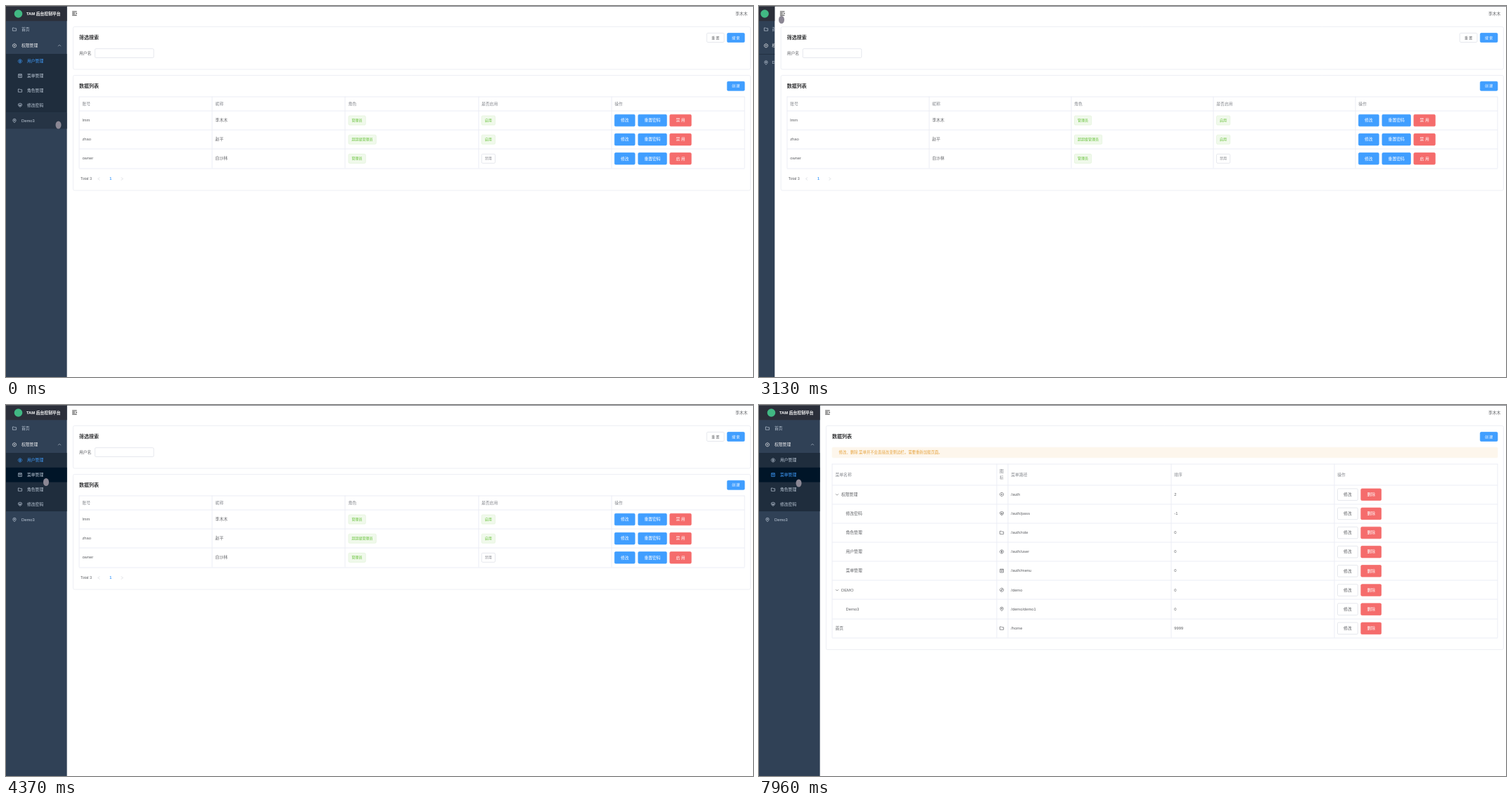
Write an HTML page with a canvas that moves like this. It is 1062 px wide and 527 px high and loops after 8000 ms.

```html
<!DOCTYPE html>
<html lang="zh-CN">
<head>
<meta charset="utf-8">
<style>
html, body { margin: 0; width: 100%; height: 100%; overflow: hidden; background: #fff; }
canvas { display: block; }
</style>
</head>
<body>
<canvas id="stage" width="1062" height="527"></canvas>
<script>
const ctx = document.getElementById('stage').getContext('2d');
const FONT = '"Liberation Sans", "Noto Sans CJK SC", "Noto Sans CJK", sans-serif';
const BLUE = '#409eff', RED = '#f56c6c', TEXT = '#606266', LINE = '#ebeef5', PALE = '#bfcbd9';
const RIGHT = 1050, LOOP = 8000, ROW = 27.15;

const TICKS = [0, 150, 300, 425, 550, 700, 850, 970, 1120, 1240, 1390, 2170, 2320, 2460, 2585, 2710,
  2860, 3010, 3130, 3260, 3380, 3510, 3640, 3760, 3890, 4010, 4130, 4250, 4370,
  6510, 6630, 6750, 6900, 7020, 7810, 7960];

// Pointer path: time, x, y
const POINTER = [[0, 74.5, 169], [150, 75.2, 168.5], [300, 75, 150], [550, 63.5, 27], [700, 82, 19],
  [850, 90, 16], [970, 96, 20], [1390, 98, 18.5], [2170, 104.5, 19.5], [2320, 103, 19], [2710, 48, 18.5],
  [2860, 33, 18.5], [3130, 32, 19.5], [3260, 33, 20], [3760, 53, 67], [3890, 53.5, 78], [4370, 57, 109.5],
  [7810, 57, 110], [7960, 56.5, 111], [LOOP, 56.5, 111]];

const ICONS = {
  folder: 'M1.5 3h5l2 2h6v8.5h-13z',
  lock: 'M8 1.5a6.5 6.5 0 1 0 .01 0zM5.5 5.5l5 5M10.5 5.5l-5 5',
  coin: 'M8 1.5a6.5 6.5 0 1 0 .01 0zM8 4v8M10 6h-3.5v2h3v2h-3.5',
  box: 'M2 2h12v12h-12zM5 2v4h6v-4M5 10h6',
  shield: 'M8 1.5l6 2v5q-1 4-6 6q-5-2-6-6v-5zM5.5 7h5v3h-5z',
  pin: 'M8 15q-5.500-5-5.500-8.500a5.500 5.500 0 0 1 11 0q0 3.500-5.500 8.500zM8 5a1.800 1.800 0 1 0 .01 0z',
  compass: 'M8 1.5a6.5 6.5 0 1 0 .01 0zM11 5l-2 4-4 2 2-4z'
};
for (const name in ICONS) ICONS[name] = new Path2D(ICONS[name]);

const USERS = [
  ['lmm', '李木木', '管理员', true],
  ['zhao', '赵平', '超超级管理员', true],
  ['owner', '白沙林', '管理员', false]
];
const MENUS = [
  ['权限管理', 'lock', '/auth', '2', 13, true],
  ['修改密码', 'shield', '/auth/pass', '-1', 19.5],
  ['角色管理', 'folder', '/auth/role', '0', 19.5],
  ['用户管理', 'coin', '/auth/user', '0', 19.5],
  ['菜单管理', 'box', '/auth/menu', '0', 19.5],
  ['DEMO', 'compass', '/demo', '0', 13, true],
  ['Demo3', 'pin', '/demo/demo1', '0', 19.5],
  ['首页', 'folder', '/home', '9999', 4.5]
];
const SUBMENU = [['用户管理', 'coin'], ['菜单管理', 'box'], ['角色管理', 'folder'], ['修改密码', 'shield']];

const clamp = v => Math.max(0, Math.min(1, v));
const lerp = (a, b, p) => a + (b - a) * p;

// CSS "ease" timing
function ease(start, length, t) {
  const x = clamp((t - start) / length);
  let lo = 0, hi = 1, s = 0;
  for (let i = 0; i < 20; i++) {
    s = (lo + hi) / 2;
    if (.75 * s * (1 - s) + s ** 3 < x) lo = s; else hi = s;
  }
  return x === 0 || x === 1 ? x : .3 * s * (1 - s) ** 2 + 3 * s * s * (1 - s) + s ** 3;
}

function mix(p) {
  const [r, g, b] = [[191, 64], [203, 158], [217, 255]].map(([from, to]) => Math.round(lerp(from, to, p)));
  return `rgb(${r},${g},${b})`;
}

function pointerAt(t) {
  const i = POINTER.findIndex(key => key[0] > t);
  const [t0, x0, y0] = POINTER[i - 1], [t1, x1, y1] = POINTER[i];
  const p = (t - t0) / (t1 - t0);
  return [lerp(x0, x1, p), lerp(y0, y1, p)];
}

function rect(x, y, w, h, color) {
  ctx.fillStyle = color;
  ctx.fillRect(x, y, w, h);
}

function text(str, x, y, { color = TEXT, size = 5.8, weight = 400, align = 'left' } = {}) {
  ctx.font = `${weight} ${size}px ${FONT}`;
  ctx.textAlign = align;
  ctx.textBaseline = 'middle';
  ctx.fillStyle = color;
  ctx.fillText(str, x, y);
}

function box(x, y, w, h, fill, border = fill, radius = 1.5) {
  ctx.beginPath();
  ctx.roundRect(x, y, w, h, radius);
  ctx.fillStyle = fill;
  ctx.fill();
  ctx.lineWidth = .7;
  ctx.strokeStyle = border;
  ctx.stroke();
}

function button(label, x, y, w, h, fill, size = 5.8) {
  const plain = fill === '#fff';
  box(x, y, w, h, fill, plain ? '#dcdfe6' : fill);
  text(label, x + w / 2, y + h / 2 + .2, { size, weight: 500, align: 'center', color: plain ? TEXT : '#fff' });
}

function tag(label, x, y, on) {
  const w = label.length * 5 + 9.2;
  box(x, y - 6.5, w, 13, on ? '#f0f9eb' : '#fff', on ? '#e1f3d8' : '#dcdfe6');
  text(label, x + w / 2, y, { size: 5, align: 'center', color: on ? '#67c23a' : '#808389' });
}

function stroke(points, color, width = .6) {
  ctx.beginPath();
  points.forEach(([x, y]) => ctx.lineTo(x, y));
  ctx.strokeStyle = color;
  ctx.lineWidth = width;
  ctx.stroke();
}

function icon(name, x, y, color) {
  ctx.save();
  ctx.translate(x - 3.2, y - 3.2);
  ctx.scale(.4, .4);
  ctx.lineWidth = 1.7;
  ctx.strokeStyle = color;
  ctx.stroke(ICONS[name]);
  ctx.restore();
}

function grid(columns, rows) {
  const left = columns[0], top = rows[0], bottom = rows[rows.length - 1];
  columns.concat(RIGHT).forEach(x => rect(Math.round(x) - .5, top, 1, bottom - top, LINE));
  rows.forEach(y => rect(left, Math.round(y) - .5, RIGHT - left, 1, LINE));
}

function card(left, top, bottom, title) {
  box(left - 8.6, top, RIGHT + 17 - left, bottom - top, '#fff', '#e6e9f0', 2);
  text(title, left, top + 15.3, { size: 7, weight: 700, color: '#303133' });
}

const heading = (str, x, y) => text(str, x, y, { color: '#85888e', weight: 500 });

function userPage(left) {
  card(left, 29.5, 90, '筛选搜索');
  button('重 置', 996.3, 38.5, 24.7, 13, '#fff', 5);
  button('搜 索', 1025.3, 38.5, 24.7, 13, BLUE, 5);
  text('用户名', left, 67);
  box(left + 22.5, 60.7, 83.5, 12.8, '#fff', '#dcdfe6');

  card(left, 98.5, 262, '数据列表');
  button('创 建', 1025.3, 107.3, 24.7, 13, BLUE, 5);
  const width = (RIGHT - left) / 5;
  const columns = [0, 1, 2, 3, 4].map(i => left + i * width);
  grid(columns, [128.5, 149, 176.2, 203.4, 230.5]);
  ['账号', '昵称', '角色', '是否启用', '操作'].forEach((name, i) => heading(name, columns[i] + 4.4, 139));
  USERS.forEach(([login, nick, role, active], i) => {
    const y = 162.5 + i * ROW, x = columns[4];
    text(login, columns[0] + 4.4, y);
    text(nick, columns[1] + 4.4, y);
    tag(role, columns[2] + 4.6, y, true);
    tag(active ? '启用' : '禁用', columns[3] + 4.6, y, active);
    button('修改', x + 4.5, y - 8.3, 28.8, 16.6, BLUE);
    button('重置密码', x + 38, y - 8.3, 40.5, 16.6, BLUE);
    button(active ? '禁 用' : '启 用', x + 83, y - 8.3, 30.4, 16.6, RED);
  });

  text('Total 3', left + 2, 245.5, { size: 5.4 });
  text('1', left + 44.8, 245.5, { size: 5.4, weight: 700, align: 'center', color: BLUE });
  [[28, -1], [61, 1]].forEach(([x, d]) =>
    stroke([[left + x - d, 243.5], [left + x + d, 245.5], [left + x - d, 247.5]], '#c0c4cc'));
}

function menuPage(left) {
  card(left, 29.5, 347.5, '数据列表');
  button('创 建', 1025.3, 38.5, 24.7, 13, BLUE, 5);
  box(left, 60.2, RIGHT - left, 14.6, '#fdf6ec');
  text('修改、删除 菜单并不会直接改变侧边栏。需要重新加载页面。', left + 9.6, 67.8, { size: 5.4, color: '#e6a23c' });

  const columns = [0, 233.5, 250, 482, 714].map(x => left + x);
  const top = 113.5;
  grid(columns, [83.5, ...Array.from({ length: 9 }, (_, i) => top + i * ROW)]);
  heading('菜单名称', columns[0] + 4.5, 99);
  heading('图', columns[1] + 4.4, 94);
  heading('标', columns[1] + 4.4, 103.5);
  ['菜单路径', '排序', '操作'].forEach((name, i) => heading(name, columns[i + 2] + 4.3, 99));
  MENUS.forEach(([name, symbol, path, order, indent, group], i) => {
    const y = top + 13.7 + i * ROW, x = columns[4];
    if (group) stroke([[left + 5, y - 1], [left + 7, y + 1], [left + 9, y - 1]], TEXT);
    text(name, left + indent, y);
    icon(symbol, columns[1] + 7.6, y - .3, TEXT);
    text(path, columns[2] + 4.3, y);
    text(order, columns[3] + 4.3, y);
    button('修改', x + 4.5, y - 8.3, 28.8, 16.6, '#fff');
    button('删除', x + 37.8, y - 8.3, 28.8, 16.6, RED);
  });
}

function navbar(width, collapsed) {
  rect(width, 0, 1062 - width, 21, '#fff');
  rect(0, 0, 1062, 1, '#85878c');
  const x = width + 7.3;
  [[7.8, 0], [9.7, 2.6], [11.5, 2.6], [13.4, 0]].forEach(([y, inset]) => {
    const start = collapsed ? inset : 0;
    stroke([[x + start, y], [x + 6.6 - inset + start, y]], '#222', .8);
  });
  const tip = collapsed ? [x, x + 1.7] : [x + 6.6, x + 4.9];
  stroke([[tip[1], 9.3], [tip[0], 10.6], [tip[1], 11.9]], '#222', .8);
  text('李木木', 1037, 11.2);
}

function sidebar(t, width, open, collapsed) {
  const switched = clamp((t - 6430) / 200);
  const subHeight = collapsed ? 0 : 83.2 * open;
  const demoTop = 68 + subHeight;
  const iconX = collapsed ? 12 : lerp(10, 12, open);
  const labelX = lerp(18.5, 22, open);
  const label = (str, y, color = PALE) => { if (!collapsed) text(str, labelX, y, { color }); };

  ctx.save();
  ctx.beginPath();
  ctx.rect(0, 0, width, 527);
  ctx.clip();
  rect(0, 0, width, 527, '#304156');
  rect(0, 0, width, 21.3, '#2b2f3a');
  rect(0, 0, width, 1, '#50535b');

  const logoX = collapsed ? width / 2 : lerp(8, 17.5, open);
  ctx.beginPath();
  ctx.arc(logoX, 11, 5.8, 0, 7);
  ctx.fillStyle = '#41b883';
  ctx.fill();
  if (!collapsed) {
    ctx.globalAlpha = open;
    text('TAM 后台控制平台', logoX + 11.5, 11.2, { color: '#fff', weight: 700 });
    ctx.globalAlpha = 1;
  }

  if (t >= 3640 && t < 4010) rect(0, 44.8, width, 23.2, '#263445');
  if (t < 300) rect(0, demoTop, width, 23.2, '#263445');
  icon('folder', iconX, 33, PALE);
  label('首页', 33.3);
  icon('lock', iconX, 56.3, '#f4f4f5');
  label('权限管理', 56.5, '#f4f4f5');
  if (!collapsed) stroke([[74, 57.2], [76, 55.2], [78, 57.2]], PALE);
  icon('pin', iconX, demoTop + 11.8, PALE);
  label('Demo3', demoTop + 11.9);

  ctx.beginPath();
  ctx.rect(0, 68, width, subHeight);
  ctx.clip();
  rect(0, 68, width, 83.2, '#1f2d3d');
  const hovered = t >= 4250 ? 1 : t >= 4010 ? 0 : -1;
  if (hovered >= 0) rect(0, 68 + hovered * 20.8, width, 20.8, '#001528');
  SUBMENU.forEach(([name, symbol], i) => {
    const y = 78.4 + i * 20.8;
    const color = i === 0 ? mix(1 - switched) : i === 1 ? mix(switched) : PALE;
    icon(symbol, 20, y, color);
    text(name, 30, y + .1, { color });
  });
  ctx.restore();
}

function draw(t) {
  const collapsed = t >= 2066 && t < 3125;
  const open = t < 3125 ? 1 - ease(2066, 280, t) : ease(3125, 280, t);
  const width = lerp(22, 86.8, open);
  const leaving = ease(6457, 400, t), entering = ease(6857, 160, t);

  rect(0, 0, 1062, 527, '#fff');
  ctx.save();
  if (t < 6857) {
    ctx.globalAlpha = 1 - leaving;
    ctx.translate(12.4 * leaving, 0);
    userPage(width + 17.2);
  } else {
    ctx.globalAlpha = entering;
    ctx.translate(-12.4 * (1 - entering), 0);
    menuPage(width + 17.2);
  }
  ctx.restore();
  navbar(width, collapsed);
  sidebar(t, width, open, collapsed);

  ctx.beginPath();
  ctx.ellipse(...pointerAt(t), 4, 5.5, 0, 0, 7);
  ctx.fillStyle = '#8b8794';
  ctx.fill();
}

function frame(now) {
  const t = now % LOOP;
  draw(TICKS.filter(tick => tick <= t).pop() || 0);
  requestAnimationFrame(frame);
}
requestAnimationFrame(frame);
</script>
</body>
</html>
```
